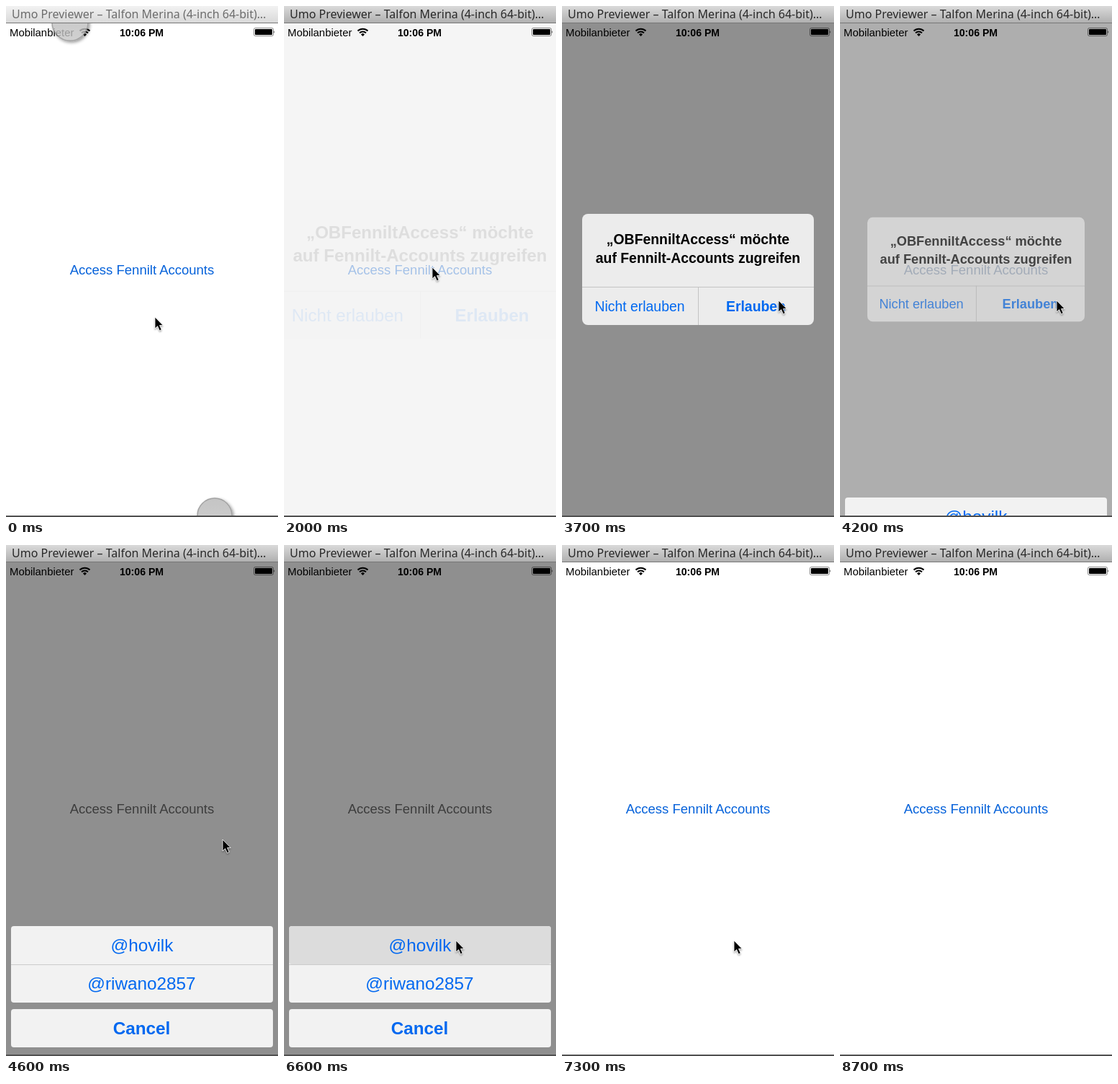
Write an HTML page that moves like this. It is 378x708 px and loops after 9200 ms.

```html
<!DOCTYPE html>
<html lang="de">
<head>
<meta charset="utf-8">
<style>
html, body { margin: 0; height: 100%; overflow: hidden; background: #fff; }
svg { display: block; width: 100vw; height: 100vh; }
text { font-family: "Liberation Sans", Arial, sans-serif; }
.mid { text-anchor: middle; }
.bold { font-weight: bold; }
.blue { fill: #0068f0; }
.rule { stroke: #c4c4c4; fill: none; }
#title { font: 16px "Noto Sans", "Open Sans", sans-serif; }
#sheet text { font-size: 24.3px; }
#alert text { font-size: 19.4px; }
</style>
</head>
<body>
<svg viewBox="0 0 378 708">
  <defs>
    <linearGradient id="active" x2="0" y2="1">
      <stop stop-color="#dadada"/><stop offset="1" stop-color="#b0b0b0"/>
    </linearGradient>
    <linearGradient id="idle" x2="0" y2="1">
      <stop stop-color="#f2f2f2"/><stop offset="1" stop-color="#d9d9d9"/>
    </linearGradient>
    <linearGradient id="knob" x2="0" y2="1">
      <stop stop-color="#b6b6b6"/><stop offset="1" stop-color="#c6c6c6"/>
    </linearGradient>
    <filter id="shade" x="-50%" y="-50%" width="200%" height="200%">
      <feDropShadow dx="0" dy="1.5" stdDeviation="1.2" flood-opacity=".4"/>
    </filter>
    <filter id="glow" x="-20%" y="-20%" width="140%" height="140%">
      <feDropShadow dx="2" dy="2" stdDeviation="2" flood-opacity=".5"/>
    </filter>
  </defs>

  <rect width="378" height="708" fill="#fff"/>
  <text id="link" class="mid" x="189" y="372" font-size="18.5">Access Fennilt Accounts</text>
  <rect id="dim" y="24" width="378" height="682"/>

  <g id="status">
    <text x="5" y="42" font-size="14.9">Mobilanbieter</text>
    <g fill="none" stroke="#000" stroke-width="2">
      <path d="M102.5 34.5A10 10 0 0 1 116.5 34.5M105 37.4A6.3 6.3 0 0 1 114 37.4"/>
    </g>
    <path d="M109.5 42L107 39.4A3.5 3.5 0 0 1 112 39.4Z"/>
    <text class="mid bold" x="188.5" y="42" font-size="14.1">10:06 PM</text>
    <rect x="344.5" y="30.5" width="27" height="11" rx="2" fill="none" stroke="#000" stroke-opacity=".45"/>
    <rect x="346" y="32" width="24" height="8" rx="1"/>
    <path d="M372.5 34q1.5 2 0 4Z"/>
  </g>

  <g id="alert">
    <rect x="28" y="288" width="322" height="154" rx="8" fill="#ececec"/>
    <path class="rule" d="M28 389.5H350M189.5 389V442"/>
    <text class="mid bold" x="189" y="330">„OBFenniltAccess“ möchte</text>
    <text class="mid bold" x="189" y="356">auf Fennilt-Accounts zugreifen</text>
    <text class="mid blue" x="108" y="423">Nicht erlauben</text>
    <text class="mid blue bold" x="269.5" y="423">Erlauben</text>
  </g>

  <g id="sheet">
    <rect x="7" y="528" width="364" height="106" rx="4" fill="#f2f2f2"/>
    <rect id="row" x="7" y="528" width="364" height="53" rx="4" fill="#dcdcdc"/>
    <path class="rule" d="M7 581.5H371" stroke-opacity=".8"/>
    <rect x="7" y="643" width="364" height="53" rx="4" fill="#f2f2f2"/>
    <text class="mid blue" x="189" y="562.5">@hovilk</text>
    <text class="mid blue" x="188.5" y="615.5">@riwano2857</text>
    <text class="mid blue bold" x="188.5" y="678">Cancel</text>
  </g>

  <g id="knobs" filter="url(#glow)" fill="url(#knob)" stroke="#8c8c8c" stroke-width="1.5">
    <circle cx="89" cy="23" r="25"/>
    <circle cx="290" cy="706" r="24"/>
  </g>

  <rect id="bar" width="378" height="23"/>
  <rect y="23" width="378" height="1" fill="#777"/>
  <text id="title" x="8" y="17">Umo Previewer – Talfon Merina (4-inch 64-bit)…</text>
  <rect y="706" width="378" height="2" fill="#505050"/>

  <path id="cursor" d="M0 0V16L3.6 12.6L6.4 18.8L9.2 17.5L6.5 11.5H11.2Z"
        stroke="#fff" stroke-width=".8" filter="url(#shade)"/>
</svg>
<script>
const LOOP = 9200, STEP = 100, DIM = .44;
const el = id => document.getElementById(id);
const set = (id, attrs) => {
  for (const k in attrs) el(id).setAttribute(k, attrs[k]);
};
const ramp = (t, a, b) => {
  const u = Math.min(1, Math.max(0, (t - a) / (b - a)));
  return u * u * (3 - 2 * u);
};
const mix = (a, b, u) => a + (b - a) * u;

// time, x, y of the pointer
const path = [
  [0, 207, 431], [600, 207, 431], [1500, 206, 362], [2100, 206, 362],
  [2500, 221, 362], [3200, 221, 362], [3700, 301, 408], [4900, 301, 408],
  [5900, 239, 548], [7700, 239, 548], [7800, 271, 485], [8000, 317, 384],
  [8100, 317, 384], [8200, 318, 382], [8300, 309, 85], [8400, 305, 10],
  [8500, 305, 10], [8600, 290, 1], [8700, 288, -40], [LOOP, 288, -40]
];
function pointer(t) {
  const i = path.findIndex(p => p[0] > t);
  const [a, x, y] = path[i - 1], [b, x2, y2] = path[i];
  const u = (t - a) / (b - a);
  return [mix(x, x2, u), mix(y, y2, u)];
}

function draw(t) {
  const alertIn = ramp(t, 1890, 2500), alertOut = ramp(t, 4000, 4470);
  const sheetIn = ramp(t, 4100, 4510), sheetOut = ramp(t, 6700, 6990);
  const alertOn = alertIn * (1 - alertOut), sheetOn = sheetIn * (1 - sheetOut);

  const scale = 1.265 - .265 * alertIn - .16 * alertOut;
  set('alert', {
    opacity: alertOn,
    transform: `translate(189 365) scale(${scale}) translate(-189 -365)`
  });
  set('sheet', {
    transform: `translate(0 ${180 * (1 - sheetOn)})`,
    visibility: sheetOn > 0 ? 'visible' : 'hidden'
  });
  set('row', { opacity: t >= 6600 ? 1 : 0 });
  set('dim', { opacity: 1 - (1 - DIM * alertOn) * (1 - DIM * sheetOn) });

  // the link loses its tint while something covers the screen
  const grey = Math.max(ramp(t, 2000, 2400) * (1 - alertOut), sheetIn * (1 - ramp(t, 6700, 6900)));
  const rgb = [6, 98, 218].map(c => Math.round(mix(c, 107, grey)));
  const pressed = t >= 1700 && t < 2400;
  set('link', {
    fill: `rgb(${rgb})`,
    opacity: pressed ? mix(.2, 1, ramp(t, 1840, 2400)) : 1
  });

  const idle = t < 200;
  set('bar', { fill: idle ? 'url(#idle)' : 'url(#active)' });
  set('title', { fill: idle ? '#6c6c6c' : '#282828' });
  set('knobs', { opacity: .8 * Math.max(0, 1 - t / 400) });
  set('cursor', { transform: `translate(${pointer(t)})` });
}

const start = performance.now();
function tick() {
  const t = Math.max(0, performance.now() - start) % LOOP;
  draw(Math.floor(t / STEP) * STEP);
  requestAnimationFrame(tick);
}
tick();
</script>
</body>
</html>
```
